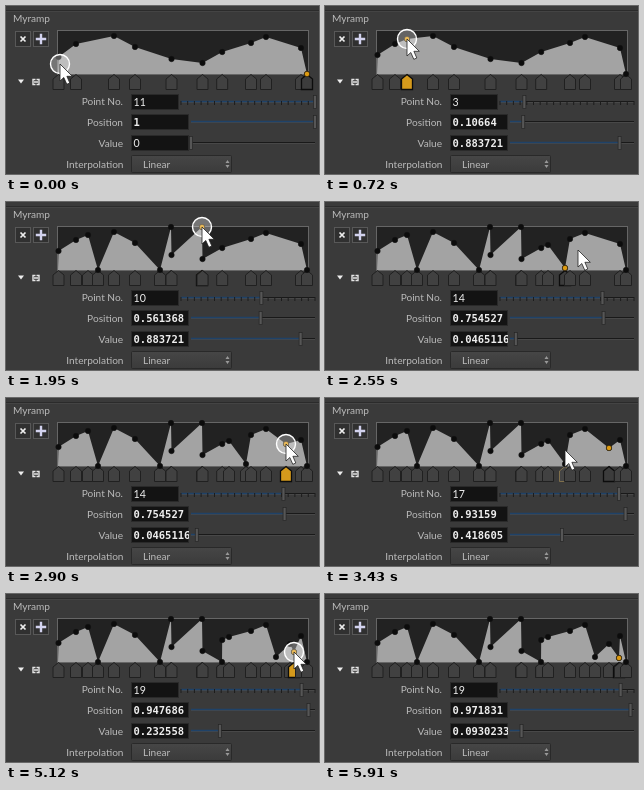
An HTML page for the animation above (6.18 s loop, 313 by 168 pixels).

```html
<!DOCTYPE html>
<html lang="en">
<head>
<meta charset="utf-8">
<title>Ramp editor</title>
<style>
  html, body { margin: 0; width: 100%; height: 100%; overflow: hidden; background: #3a3a3a; }
  #stage { display: block; width: 313px; height: 168px; }
  text { font: 10.1px Lato, "Open Sans", sans-serif; fill: #bbb; }
  .label { text-anchor: end; }
  .field { fill: #131313; stroke: #2a2a2a; }
  .value { fill: #eee; font-size: 10.6px; }
  .bold { font: bold 10.5px "DejaVu Sans Mono", monospace; }
  .button { fill: #303030; stroke: #585858; }
</style>
</head>
<body>
<svg id="stage" viewBox="0 0 313 168">
  <defs>
    <linearGradient id="menu" x2="0" y2="1">
      <stop stop-color="#464646"/><stop offset="1" stop-color="#3b3b3b"/>
    </linearGradient>
  </defs>
  <rect width="313" height="168" fill="#3a3a3a"/>
  <path d="M0 4.5H313" stroke="#2b2b2b"/>
  <path d="M0 5.5H313" stroke="#444"/>
  <text x="7" y="16">Myramp</text>

  <rect class="button" x="9.5" y="25.5" width="15" height="15"/>
  <rect class="button" x="27.5" y="25.5" width="15" height="15"/>
  <path d="M14.5 30.5l5 5m0-5l-5 5" stroke="#eee" stroke-width="1.7"/>
  <path d="M35 27.8v10.4M29.8 33h10.4" stroke="#d2d2ee" stroke-width="2.4"/>
  <path d="M12 73.5h6l-3 4z" fill="#eee"/>
  <path d="M29.5 73.500h-2.500v5h2.500M30.500 73.500h2.500v5h-2.500M28 76h4" fill="none" stroke="#e4e4e4" stroke-width="1.400"/>

  <rect x="51.5" y="24.5" width="251" height="44" fill="#222" stroke="#666"/>
  <polygon id="area" fill="#a3a3a3"/>
  <g id="marks"></g>

  <text class="label" x="117" y="98.500">Point No.</text>
  <text class="label" x="117" y="119.500">Position</text>
  <text class="label" x="117" y="140.500">Value</text>
  <text class="label" x="117.500" y="161.500">Interpolation</text>
  <g id="rows"></g>

  <rect x="125.500" y="149.500" width="100" height="17" rx="1" fill="url(#menu)" stroke="#292929"/>
  <text x="137" y="161.500">Linear</text>
  <path d="M219.500 157l2-3 2 3zM219.500 159l2 3 2-3z" fill="#999"/>
  <g id="pointer"></g>
</svg>
<script>
const LOOP = 6180, STEP = 88.2, LAST = 67;
const LEFT = 52.5, RIGHT = 301, TOP = 25, BASE = 68;
const $ = id => document.getElementById(id);
const ease = u => u < .5 ? 4 * u ** 3 : 1 - 4 * (1 - u) ** 3;
const mix = (a, b, u) => a + (b - a) * u;
const clamp = (v, lo, hi) => Math.min(hi, Math.max(lo, v));

const initial = { first: [LEFT, 51], b: [70, 38], c: [108, 30], d: [129, 41], e: [165.5, 53],
  f: [196.5, 57], mid: [216.2, 46], h: [245, 37], i: [260, 31], j: [295, 42], end: [RIGHT, BASE] };

// Pointer gestures; a drag ends at (x, y) and starts (dx, dy) away from there.
const drag = (t0, t1, id, x, y, dx = -4, dy = -4) =>
  ({ kind: 'drag', t0, t1, id, from: [x + dx, y + dy], to: [x, y] });
const rest = (t, x, y, id, kind = 'rest') =>
  ({ kind, t0: t, t1: t, id, from: [x, y], to: [x, y] });

const gestures = [
  drag(60, 280, 'first', 52, 49, 2, 9),
  drag(560, 710, 'rise', 82, 33),
  drag(890, 1070, 'notch', 92, BASE, -1, -12),
  drag(1230, 1385, 'valley', 154, BASE, -12, -5),
  drag(1560, 1690, 'peak', 165, TOP, -2, 21),
  drag(1810, 1960, 'peak2', 196, TOP, -4, 5),
  drag(2140, 2230, 'ledge', 223, 43),
  drag(2320, 2440, 'dip', 240, 66, -3, -10),
  rest(2550, 253, 48),
  drag(2900, 3080, 'step', 284, 50),
  rest(3430, 240, 52, 'dip'),
  { ...drag(3560, 3820, 'dip', 243, 154, -3, -79), kind: 'remove' },
  drag(4100, 4215, 'drop', 216, BASE, -2, -8),
  rest(4315, 227, 65, 'mid', 'pick'),
  drag(4720, 4880, 'low', 270, 63, -2, -9),
  drag(5010, 5540, 'tip', 294, 64, -6, -6),
  rest(5800, 300, 190),
  rest(LOOP, 300, 190)
];
const pulls = g => g.kind === 'drag' || g.kind === 'remove';
const keys = [[0, [54, 58]], ...gestures.flatMap(g => [[g.t0, g.from], [g.t1, g.to]])];

function cursorAt(t) {
  const n = Math.max(1, keys.findIndex(k => k[0] >= t));
  const [t0, a] = keys[n - 1], [t1, b] = keys[n];
  const u = ease((t - t0) / (t1 - t0));
  return a.map((v, i) => Math.round(mix(v, b[i], u)));
}

function stateAt(t) {
  const pos = { ...initial };
  let selected = ['end'];
  for (const g of gestures) {
    if (t < g.t0) break;
    if (g.kind === 'rest') continue;
    selected.push(g.id);
    const [x, y] = cursorAt(Math.min(t, g.t1));
    if (g.kind === 'drag') pos[g.id] = [clamp(x, LEFT, RIGHT), clamp(y, TOP, BASE)];
    if (g.kind === 'remove' && y > 100) delete pos[g.id];
  }
  const points = Object.entries(pos)
    .map(([id, [x, y]]) => ({ id, x, y }))
    .sort((p, q) => p.x - q.x);
  return { points, selected: selected.filter(id => pos[id]).pop() };
}

const house = (x, fill, stroke, w = 1) =>
  `<path d="M${x} 68.5l5.500 4.500v10.500h-11v-10.500z" fill="${fill}" stroke="${stroke}" stroke-width="${w}"/>`;
const dot = (p, fill) =>
  `<circle cx="${p.x}" cy="${p.y}" r="2.700" fill="${fill}" stroke="#111" stroke-width=".6"/>`;

function drawRamp(t) {
  const { points, selected } = stateAt(t);
  const held = gestures.some(g => pulls(g) && g.id === selected && t >= g.t0 && t <= g.t1);
  const hover = gestures.find(g => !pulls(g) && Math.abs(t - g.t0) < 100);
  $('area').setAttribute('points',
    `52,68 ${points.map(p => `${p.x},${p.y}`).join(' ')} 302,68`);
  const handles = points.map(p => {
    if (hover && hover.id === p.id) return house(p.x, '#444', '#80704c');
    if (p.id !== selected) return house(p.x, '#414141', '#202020');
    return house(p.x, held ? '#d59a1c' : '#3c3c3c', '#0c0c0c', 1.3);
  });
  const chosen = points.find(p => p.id === selected);
  $('marks').innerHTML = handles.join('') +
    points.map(p => dot(p, '#0c0c0c')).join('') + dot(chosen, '#dd9a10');
}

function row(y, width, value, u, bold, ticks) {
  const x0 = 127 + width, x1 = 309, x = mix(x0, x1, u);
  let marks = '';
  if (ticks) for (let i = 0; i <= 20; i++) marks += `M${mix(x0, x1, i / 20)} ${y + 7}v4`;
  return `<rect class="field" x="125.500" y="${y + .5}" width="${width - 1}" height="15"/>
    <svg x="126" y="${y}" width="${width - 1}" height="16">
      <text class="value ${bold ? 'bold' : ''}" x="1.500" y="11.800">${value}</text></svg>
    <path d="M${x0} ${y + 7.5}H${x1}" stroke="#191919"/>
    <path d="M${x0} ${y + 8.5}H${x1}" stroke="#484848"/>
    <path d="M${x0} ${y + 7.5}H${x}" stroke="#1f4268" stroke-width="1.500"/>
    <path d="${marks}" stroke="#1c1c1c"/>
    <rect x="${x - 1.5}" y="${y + 1.5}" width="3" height="13" fill="#565656" stroke="#252525" stroke-width=".7"/>`;
}

function drawFields(t) {
  const { points, selected } = stateAt(t);
  const n = points.findIndex(p => p.id === selected), p = points[n];
  const u = (p.x - LEFT) / (RIGHT - LEFT), v = (BASE - p.y) / (BASE - TOP);
  const show = k => Number(k.toPrecision(6));
  $('rows').innerHTML = row(88, 48, n + 1, n / (points.length - 1), false, true) +
    row(108, 58, show(u), u, true) + row(129, 58, show(v), v, v > 0);
}

function drawPointer(t) {
  const [x, y] = cursorAt(t);
  const pressed = gestures.some(g => pulls(g) && t >= g.t0 - STEP && t <= g.t1);
  const ring = `<circle cx="${x}" cy="${y}" r="9.500" fill="#fff" fill-opacity=".3" stroke="#fff" stroke-width="1.400"/>`;
  $('pointer').innerHTML = (pressed ? ring : '') +
    `<path transform="translate(${x} ${y})" d="M0 0V17L3.800 13.500 6.800 20.300 9.800 19 6.900 12.300H12.300Z"
      fill="#fff" stroke="#222" stroke-width=".8"/>`;
}

let shown = -1;
function tick() {
  const t = performance.now() % LOOP;
  const n = Math.min(LAST, Math.floor((t + 15) / STEP));
  if (n !== shown) {
    shown = n;
    drawRamp(n * STEP);
    drawFields(Math.max(0, n - 1) * STEP); // fields trail by one step
    drawPointer(n * STEP);
  }
  requestAnimationFrame(tick);
}
tick();
</script>
</body>
</html>
```
